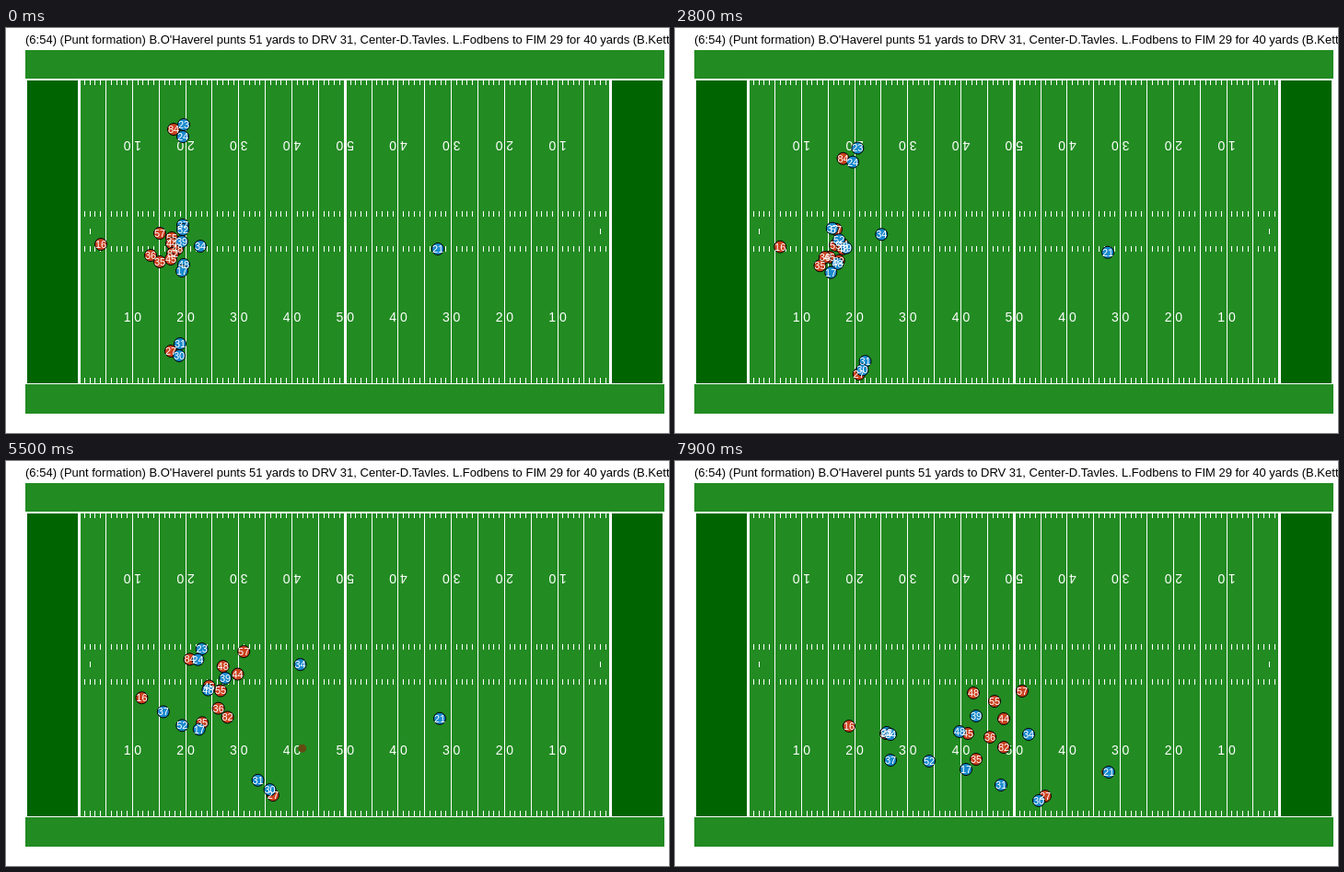
Recreate the animation shown at these times as an HTML page. Size 720x440 px, loop 8000 ms.

```html
<!DOCTYPE html>
<html lang="en">
<head>
<meta charset="utf-8">
<title>Punt return</title>
<style>
  html, body { margin: 0; width: 100%; height: 100%; overflow: hidden; background: #fff; }
  svg { display: block; width: 720px; height: 440px; }
  text { font-family: "Liberation Sans", Arial, sans-serif; }
  .title { font-size: 13px; }
  .yards { font-size: 14px; fill: #fff; text-anchor: middle; }
  .label { font-size: 11px; fill: #fff; text-anchor: middle; }
  .disc { stroke: #000; stroke-width: 1; }
  .home { fill: #cb4220; }
  .away { fill: #1a8acd; }
</style>
</head>
<body>
<svg viewBox="0 0 720 440">
  <text class="title" x="21" y="17">(6:54) (Punt formation) B.O'Haverel punts 51 yards to DRV 31, Center-D.Tavles. L.Fodbens to FIM 29 for 40 yards (B.Kettom)</text>
  <g id="field"></g>
  <circle id="ball" r="4.5" fill="#654a12"/>
  <g id="homeDiscs"></g>
  <g id="awayDiscs"></g>
  <g id="labels"></g>
</svg>
<script>
const LOOP = 8000, STEP = 100;
const GREEN = '#228b22', DARK = '#006400', WHITE = '#fff';
const byId = id => document.getElementById(id);

function add(parent, tag, attrs, text) {
  const node = document.createElementNS('http://www.w3.org/2000/svg', tag);
  for (const key in attrs) node.setAttribute(key, attrs[key]);
  if (text) node.textContent = text;
  parent.appendChild(node);
  return node;
}

// ---- Field ----
const field = byId('field');
const rect = (x, y, width, height, fill) => add(field, 'rect', { x, y, width, height, fill });
const yardX = yard => 79.67 + yard * 5.7714;

function drawField() {
  rect(21, 24, 694, 31, GREEN);
  rect(21, 387, 694, 32, GREEN);
  rect(23, 57, 55, 329, DARK);
  rect(658, 57, 55, 329, DARK);
  rect(81, 57, 574, 329, GREEN);

  for (let yard = 1; yard < 100; yard++) {
    const x = Math.floor(yardX(yard));
    if (yard === 50) rect(x - 1, 57, 3, 329, WHITE);
    else if (yard % 5 === 0) rect(x, 57, 1, 329, WHITE);
    else for (const y of [57, 199, 237, 380]) rect(x, y, 1, y === 57 ? 5 : 6, WHITE);
    if (yard === 2 || yard === 98) rect(x, 218, 1, 6, WHITE);
  }

  for (let yard = 10; yard <= 90; yard += 10) {
    const x = yardX(yard);
    const number = Math.min(yard, 100 - yard) / 10 + ' 0';
    add(field, 'text', { class: 'yards', x, y: 319 }, number);
    add(field, 'text', { class: 'yards', transform: `translate(${x} 123) rotate(180)` }, number);
  }
}

// ---- Motion, in seconds ----
const SNAP = 1.4, CATCH = 2.2, KICK = 3.2, RELEASE = 3.6, END = 7.9;

const progress = (t, from, to) => Math.min(1, Math.max(0, (t - from) / (to - from)));
const mix = (a, b, u) => a + (b - a) * u;
const mixPoint = (a, b, u) => [mix(a[0], b[0], u), mix(a[1], b[1], u)];
const easeOut = (u, power) => 1 - (1 - u) ** power;

// Running styles downfield: pace is the easing power, bend the sideways arc
const chase = { pace: 1.25, bend: 0 };
const swing = { pace: 1.15, bend: -22 };
const trail = { pace: 1.8, bend: 28 };
const peel = { pace: 0.7, bend: -40 };

const movers = [];
function place(nodes, [x, y]) {
  const transform = `translate(${x.toFixed(2)} ${y.toFixed(2)})`;
  for (const node of nodes) node.setAttribute('transform', transform);
}

// A player stands at the line, battles until the release, then runs downfield
function player(team, number, style, line, release, end) {
  const disc = add(byId(team + 'Discs'), 'circle', { class: 'disc ' + team, r: 6.5 });
  const label = add(byId('labels'), 'text', { class: 'label', y: 4 }, String(number));
  const at = t => {
    if (t < RELEASE) return mixPoint(line, release, progress(t, SNAP, RELEASE) ** 1.4);
    const u = progress(t, RELEASE, END);
    const [x, y] = mixPoint(release, end, u ** style.pace);
    return [x, y + style.bend * Math.sin(Math.PI * u)];
  };
  movers.push(t => place([disc, label], at(t)));
  return at;
}
const home = (...args) => player('home', ...args);
const away = (...args) => player('away', ...args);

drawField();

const punter = home(16, chase, [103, 235], [124, 240], [189, 288]);
home(57, swing, [167, 223], [182, 215], [377, 250]);
home(55, chase, [180, 228], [169, 243], [347, 261]);
home(44, swing, [180, 234], [184, 236], [357, 280]);
home(48, swing, [186, 240], [179, 240], [324, 252]);
home(82, chase, [181, 245], [175, 260], [357, 311]);
home(45, swing, [179, 251], [158, 247], [318, 296]);
home(36, chase, [157, 247], [168, 251], [342, 300]);
home(35, chase, [167, 254], [149, 262], [327, 324]);
home(84, chase, [182, 110], [183, 170], [229, 296]);
home(27, swing, [179, 351], [218, 398], [402, 364]);

away(23, chase, [193, 105], [203, 153], [230, 295]);
away(24, chase, [192, 118], [194, 170], [234, 297]);
away(37, trail, [192, 214], [152, 221], [234, 325]);
away(52, trail, [192, 219], [166, 240], [276, 326]);
away(39, swing, [191, 232], [181, 245], [327, 277]);
away(34, peel, [211, 237], [236, 213], [384, 297]);
away(48, swing, [193, 257], [162, 255], [309, 294]);
away(17, chase, [191, 264], [150, 267], [316, 335]);
away(31, swing, [189, 343], [222, 379], [354, 352]);
away(30, swing, [188, 356], [217, 385], [395, 369]);
away(21, chase, [469, 240], [471, 247], [471, 338]);

// The ball is snapped to the punter, carried, then kicked in a slowing arc
const spot = [180, 239], landing = [467, 338];
function ballAt(t) {
  if (t < KICK) return mixPoint(spot, punter(t), progress(t, SNAP, CATCH));
  const from = punter(KICK), u = progress(t, KICK, END);
  return [mix(from[0], landing[0], easeOut(u, 1.3)), mix(from[1], landing[1], easeOut(u, 2))];
}
movers.push(t => place([byId('ball')], ballAt(t)));

// ---- Playback ----
const start = performance.now();
function frame() {
  const time = (performance.now() - start) % LOOP;
  const t = Math.floor(time / STEP) * STEP / 1000;
  for (const update of movers) update(t);
  requestAnimationFrame(frame);
}
frame();
</script>
</body>
</html>
```
